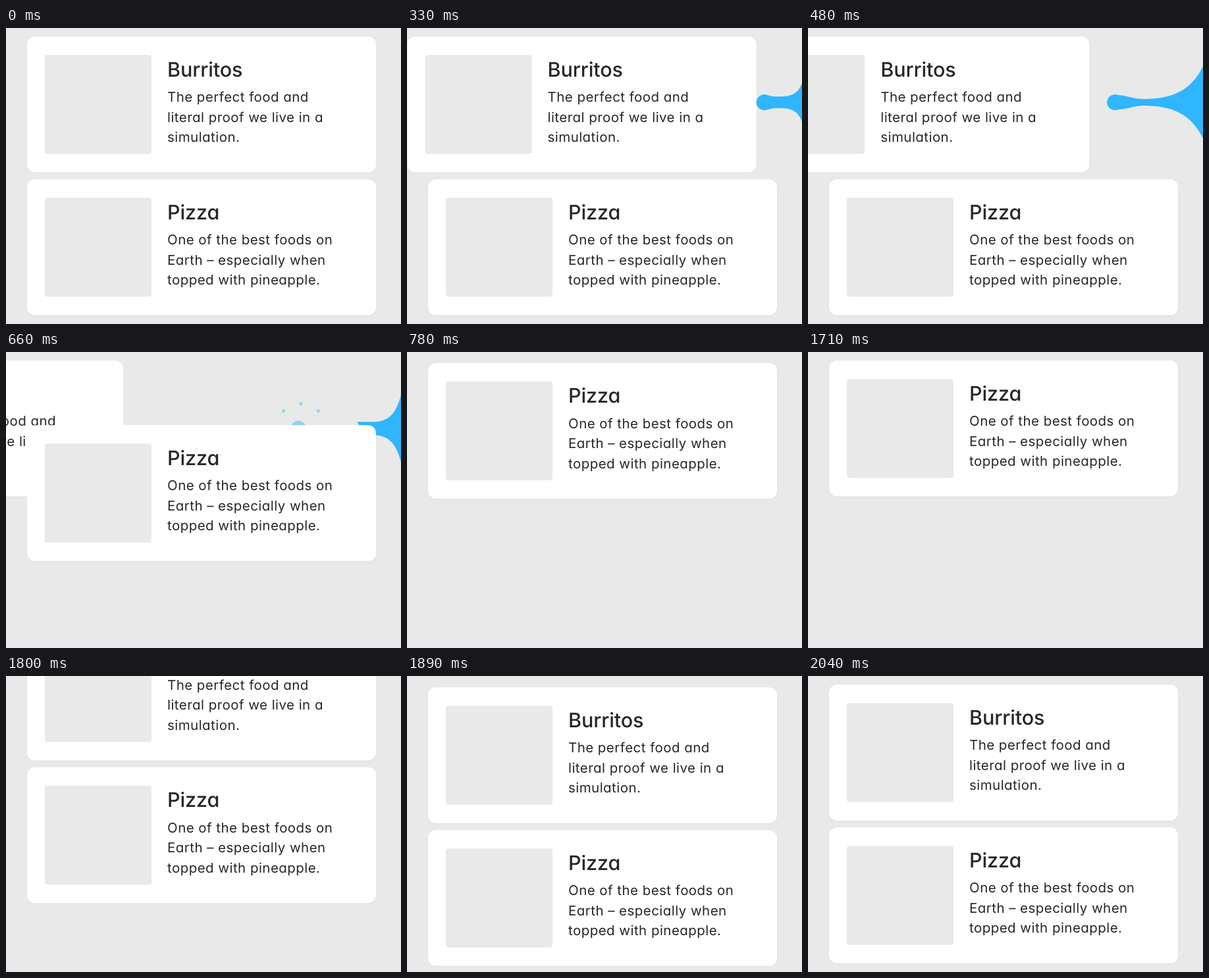
These frames come from a looping animation (600 px wide and 450 px high, 2130 ms). An HTML page:

```html
<!DOCTYPE html>
<html lang="en">
<head>
<meta charset="utf-8">
<title>Swipe to remove a card</title>
<style>
  html, body { margin: 0; width: 100%; height: 100%; overflow: hidden; background: #e9e9e9; }
  svg { display: block; width: 100vw; height: 100vh; }
  text {
    font: 400 20.5px Inter, "Open Sans", sans-serif;
    font-feature-settings: "cv11";
    letter-spacing: .45px;
    text-rendering: geometricPrecision;
    fill: #272727;
  }
  .title { font-size: 30.5px; font-weight: 500; letter-spacing: -.1px; }
  .card { filter: drop-shadow(0 1px 1.5px rgba(0, 0, 0, .03)); }
  #goo, #pop { fill: #30b5ff; }
</style>
</head>
<body>
<svg viewBox="0 0 600 450">
  <g id="first" class="card"></g>
  <g id="goo">
    <path id="half"/>
    <use href="#half" transform="scale(1 -1)"/>
  </g>
  <g id="pop"></g>
  <g id="second" class="card"></g>
</svg>
<script>
const LOOP = 2130, ROW = 217;
const SNAP = 555, GOO_GONE = 780, RETURN = 1716;
const $ = id => document.getElementById(id);
const clamp = v => Math.min(1, Math.max(0, v));
const span = (t, from, to) => clamp((t - from) / (to - from));
const swing = u => Math.sin(u * Math.PI / 2) ** 2;

function fillCard(id, title, lines) {
  $(id).innerHTML = `
    <rect x="32" y="13" width="530" height="206.5" rx="12" fill="#fff"/>
    <rect x="59" y="41" width="162" height="150.5" rx="4" fill="#e9e9e9"/>
    <text class="title" x="245" y="73.7">${title}</text>` +
    lines.map((line, i) => `<text x="245" y="${112 + i * 30.5}">${line}</text>`).join("");
}

function place(id, x, y) {
  $(id).setAttribute("transform", `translate(${x} ${y})`);
}

// Travel from 0 to 1, overshooting slightly before settling
function settle(t, start, peak, end) {
  const over = 4.5 / ROW;
  return (1 + over) * swing(span(t, start, peak) ** .82) - over * swing(span(t, peak, end));
}

// Upper half of the stretched drop, measured from the right edge
function flare(reach, height, neck, tail) {
  return `M0 1V${-height}C${-.13 * reach} ${-height * .33} ${-.35 * reach} ${-neck} ${-.67 * reach} ${-neck}${tail}V1Z`;
}

function drawGoo(t) {
  const reach = 156 * Math.sin(span(t, 225, 615) * Math.PI / 2);
  const grown = clamp(reach / 134);
  const ballX = 600 - reach + 14 * (1 - grown);
  const gone = span(t, SNAP, GOO_GONE);
  const active = t > 225 && t < GOO_GONE;
  let shape = "";

  if (active && t < SNAP) {
    const d = 600 - ballX, neck = 5 + 7 * (1 - grown);
    shape = flare(d, 55 * Math.min(1, grown * 1.1), neck,
      `C${-.78 * d} ${-neck} ${-.87 * d} -10.5 ${4 - d} -11.3A12 12 0 0 0 ${-d - 12} 0`);
  } else if (active) {
    const stub = 126 * (1 - gone);
    shape = flare(stub, 57 * (1 - gone ** 3), 10.5 * (1 - gone ** 4), `H${-stub}L${3 - stub} -5`);
  }
  $("half").setAttribute("d", shape);
  place("goo", 600, 113 + 7 * gone);

  let pop = "";
  if (t >= SNAP && t < 735) {
    const x = 448, y = 116;
    pop = `<circle cx="${ballX}" cy="${y}" r="11.5"/>`;
    if (t > 570) {
      const ring = 12 + 25 * (t - 570) / 90;
      for (let i = 0; i < 8; i++) {
        const a = i * Math.PI / 4;
        pop += `<circle cx="${x + ring * Math.cos(a)}" cy="${y + ring * Math.sin(a)}" r="2.4"/>`;
      }
    }
  }
  $("pop").innerHTML = pop;
  $("pop").setAttribute("opacity", 1 - span(t, 585, 735));
}

function render(t) {
  const returning = t > RETURN;
  const up = settle(t, 525, 825, 1050);
  const down = settle(t, RETURN, 1895, 2070);
  const shift = ROW * (down - up);
  const swipe = -382 * Math.max(0, (t - 150) / 510) ** 2.41;

  place("first", returning ? 0 : Math.max(-620, swipe), returning ? shift : 0);
  place("second", 0, ROW + shift);
  drawGoo(t);
}

function tick() {
  render(performance.now() % LOOP);
  requestAnimationFrame(tick);
}

fillCard("first", "Burritos", ["The perfect food and", "literal proof we live in a", "simulation."]);
fillCard("second", "Pizza", ["One of the best foods on", "Earth – especially when", "topped with pineapple."]);
tick();
</script>
</body>
</html>
```
